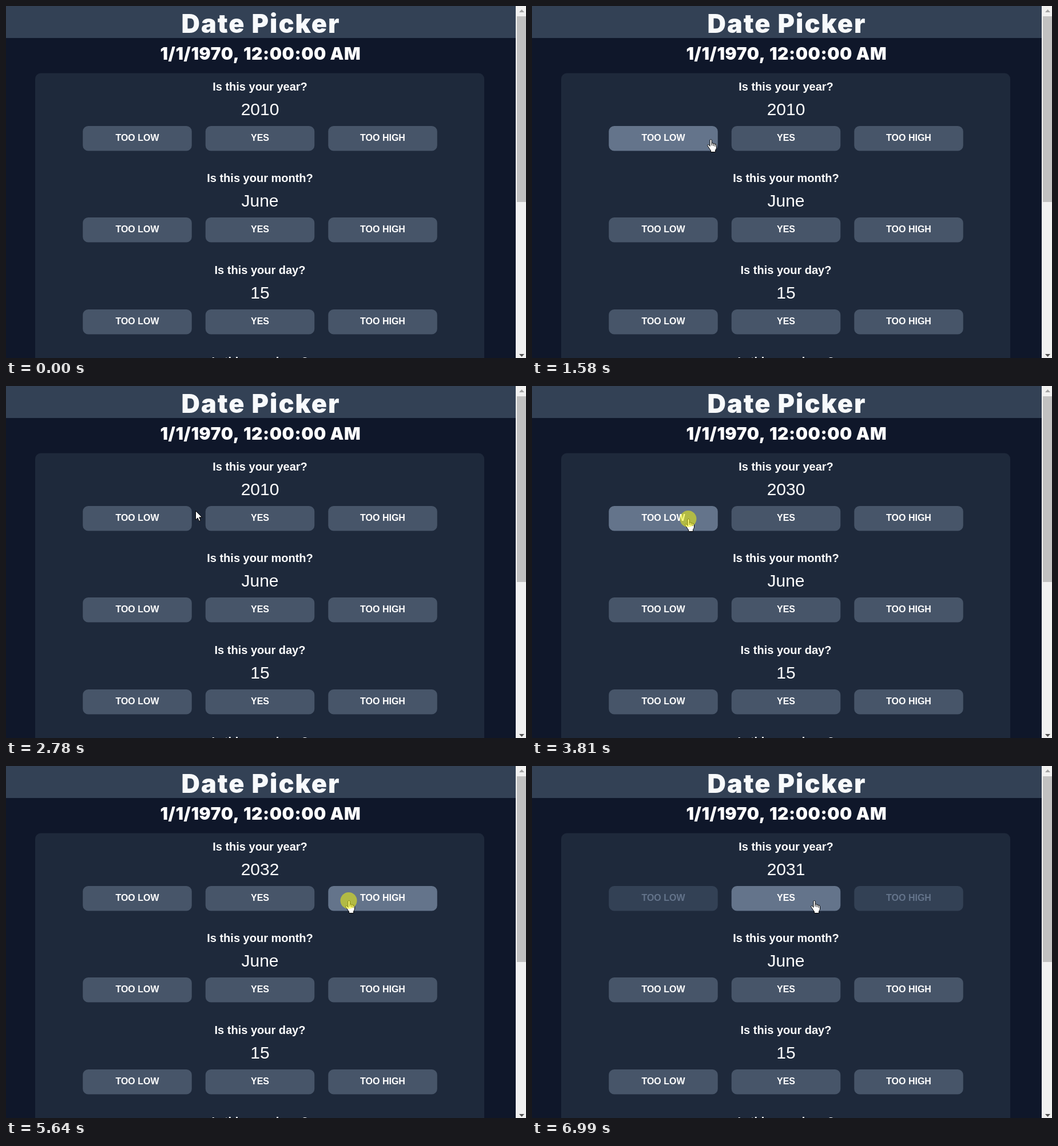
Recreate the animation shown at these times as an HTML page with a canvas. Size 909 by 616 pixels, loop 8 s.

```html
<!DOCTYPE html>
<html lang="en">
<head>
<meta charset="utf-8">
<title>Date Picker</title>
<style>
  html, body { margin: 0; width: 100%; height: 100%; overflow: hidden; background: #0f172a; }
  canvas { display: block; }
</style>
</head>
<body>
<canvas id="stage" width="909" height="616"></canvas>
<script>
const ctx = document.getElementById('stage').getContext('2d');
const LOOP = 8000;
const STEP = 107;
const MID = 444;
const BUTTON = { w: 190.5, h: 43.5, gap: 24 };
const SANS = '"Liberation Sans", Arial, sans-serif';
const BLACK = 'Inter, "Arial Black", sans-serif';

const LABELS = ['TOO LOW', 'YES', 'TOO HIGH'];
const UNITS = { year: '', month: 'June', day: '15', hour: '12' };

// each click is pressed, then released with an answer
const CLICKS = [
  { down: 3090, up: 3480, answer: 'low' },
  { down: 3480, up: 3810, answer: 'low' },
  { down: 3810, up: 4020, answer: 'low' },
  { down: 4680, up: 4780, answer: 'high' },
  { down: 5100, up: 5200, answer: 'high' },
  { down: 5640, up: 5750, answer: 'high' }
];

// the pointer enters at ENTRY, then glides: start, end, x, y
const ENTRY = { t: 200, x: 232, y: 288 };
const GLIDES = [
  [200, 520, 362, 192], [520, 720, 568, 230], [720, 940, 655, 231],
  [940, 1580, 312, 233], [1580, 1890, 273, 234], [1995, 2450, 580, 232],
  [2450, 2780, 331, 218], [2780, 3090, 273, 232], [4020, 4470, 562, 242],
  [4470, 4680, 591, 240], [4800, 5100, 599, 235], [6363, 6470, 583, 235],
  [6563, 6990, 493, 235]
];

const ARROW = new Path2D('M.5 .5V16.2L4.1 12.8L6.6 18.5L9.2 17.4L6.8 11.8H11.8Z');
const HAND = new Path2D('M5 2.2C5 .1 8.2 .1 8.2 2.2V7.3C8.7 6.4 11 6.6 11.2 8.2' +
  'C11.9 7.3 13.8 7.7 14 9.2C14.9 8.5 16.5 9 16.5 10.7V15C16.5 17 14.6 18.2 14.6 20V22.5H6.6V20' +
  'C5.2 18.3 4 16.4 2.8 14.3L.8 11.6C.2 10.2 2 9.1 3.2 10.3L5 12.4Z');

// Climb by tens until too high, then halve the range.
function guessAt(t) {
  let low = 2000, high = Infinity, year = 2010;
  for (const { up, answer } of CLICKS) {
    if (t < up) break;
    if (answer === 'low') low = year;
    else high = year;
    year = high === Infinity ? low + 10 : Math.floor((low + high) / 2);
  }
  return { year, settled: high - low <= 2 };
}

// The pointer slows into each stop and is redrawn once per STEP.
function pointerAt(t) {
  let { x, y } = ENTRY;
  for (const [start, end, toX, toY] of GLIDES) {
    if (t < start) break;
    const steps = Math.round((end - start) / STEP);
    const part = Math.min(1, Math.floor((t - start) / (end - start) * steps) / steps);
    const ease = Math.sin(part * Math.PI / 2);
    x += (toX - x) * ease;
    y += (toY - y) * ease;
  }
  return { x: Math.round(x), y: Math.round(y) };
}

function text(str, x, y, font, color = '#fff', spacing = 0) {
  ctx.font = font;
  ctx.letterSpacing = spacing + 'px';
  ctx.fillStyle = color;
  ctx.fillText(str, x + spacing / 2, y);
}

function box(x, y, w, h, color, r = 0) {
  ctx.fillStyle = color;
  ctx.beginPath();
  ctx.roundRect(x, y, w, h, r);
  ctx.fill();
}

function triangle(x, y, w, h, color) {
  ctx.fillStyle = color;
  ctx.beginPath();
  ctx.moveTo(x - w, y);
  ctx.lineTo(x + w, y);
  ctx.lineTo(x, y + h);
  ctx.fill();
}

function scrollbar() {
  box(891, 0, 18, 616, '#f1f1f1');
  box(893, 18, 16, 325, '#c1c1c1');
  triangle(901.5, 11, 4.5, -5, '#a3a3a3');
  triangle(901.5, 609, 4.5, 5, '#505050');
}

function drawPointer({ x, y }, isHand, pressed) {
  const shape = isHand ? HAND : ARROW;
  ctx.save();
  ctx.translate(isHand ? x - 6 : x, y);
  ctx.lineWidth = 1;
  ctx.lineJoin = 'round';
  ctx.fillStyle = '#fff';
  ctx.strokeStyle = '#000';
  ctx.fill(shape);
  ctx.stroke(shape);
  if (isHand) {
    ctx.beginPath();
    for (let i = 0; i < 3; i++) {
      ctx.moveTo(8.2 + i * 2.9, 7 + i);
      ctx.lineTo(8.2 + i * 2.9, 11 + i);
    }
    ctx.stroke();
  }
  ctx.restore();
  if (pressed) box(x - 14.5, y - 14, 29, 29, 'rgba(255,255,0,.5)', 14.5);
}

function draw(t) {
  const { year, settled } = guessAt(t);
  const shown = t >= ENTRY.t;
  const tip = pointerAt(t);
  const { w, h, gap } = BUTTON;
  let overButton = false;

  box(0, 0, 909, 616, '#0f172a');
  box(0, 0, 892, 56, '#334155');
  ctx.textAlign = 'center';
  text('Date Picker', MID + .5, 47, '900 45px ' + BLACK, '#f8fafc', 2);
  text('1/1/1970, 12:00:00 AM', MID + .5, 94, '900 30px ' + BLACK, '#fff', .55);
  box(51, 117.5, 785, 520, '#1e293b', 10);

  Object.entries(UNITS).forEach(([unit, value], row) => {
    const top = Math.round(row * 160.4);
    const y = 210 + top;
    text(`Is this your ${unit}?`, MID, 148 + top, 'bold 20px ' + SANS);
    text(value || year, MID, 191 + top, '30px ' + SANS);
    LABELS.forEach((label, col) => {
      const mid = MID + (col - 1) * (w + gap);
      const over = shown && Math.abs(tip.x - mid) < w / 2 && tip.y >= y && tip.y < y + h;
      const off = settled && row === 0 && label !== 'YES';
      overButton = overButton || over;
      box(mid - w / 2, y, w, h, off ? '#334155' : over ? '#64748b' : '#475569', 9.5);
      text(label, mid, 236 + top, 'bold 16px ' + SANS, off ? '#64748b' : '#fff');
    });
  });

  scrollbar();
  const pressed = CLICKS.some(({ down, up }) => t >= down && t < up);
  if (shown) drawPointer(tip, overButton, pressed);
}

const start = performance.now();
function tick() {
  draw((performance.now() - start) % LOOP);
  requestAnimationFrame(tick);
}
tick();
</script>
</body>
</html>
```
